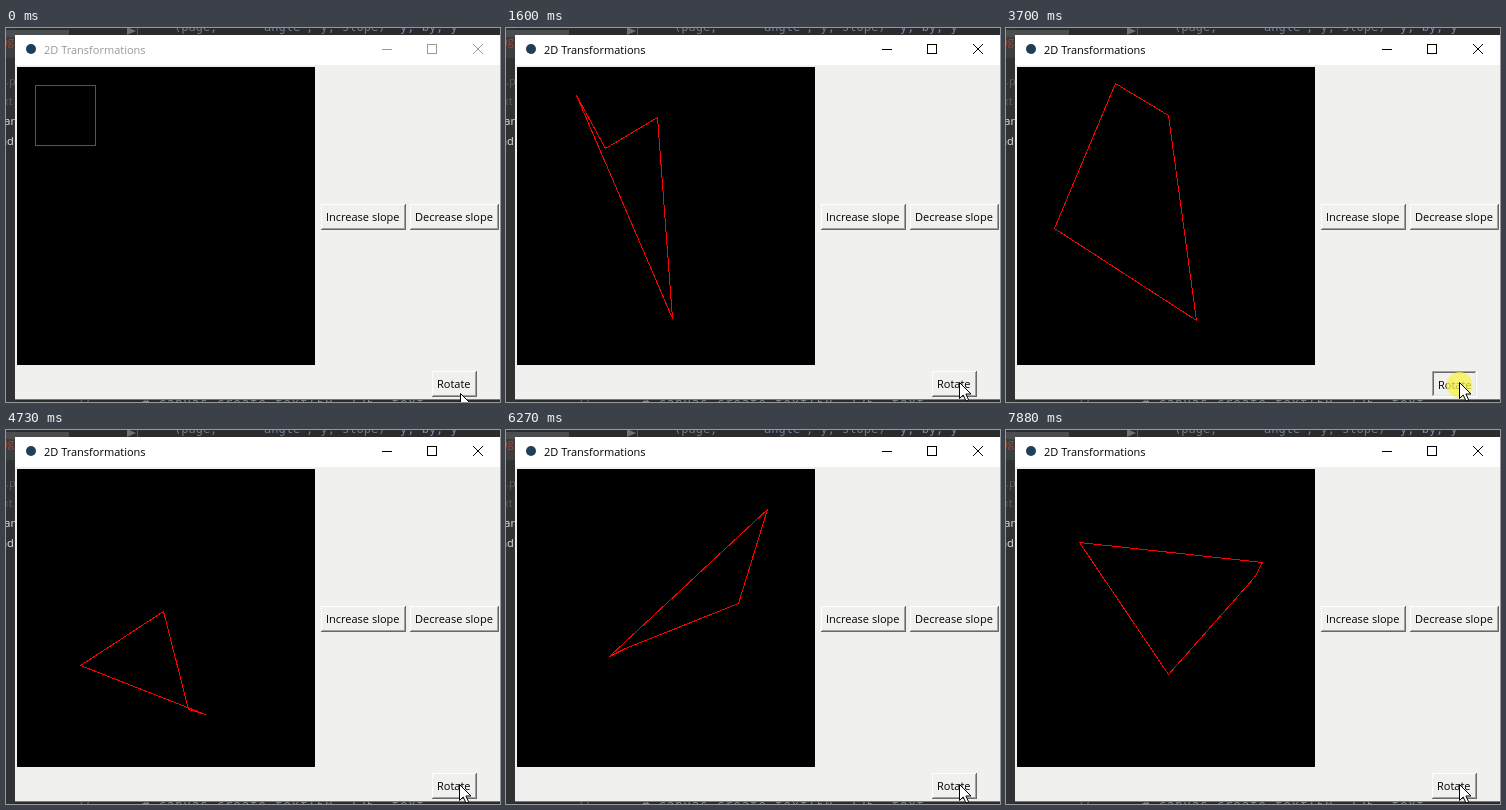
Animation of 494 by 374 pixels, one loop 8000 ms. Source, as an HTML page:

```html
<!DOCTYPE html>
<html lang="en">
<head>
<meta charset="utf-8">
<title>2D Transformations</title>
<style>
  html, body { margin: 0; width: 100%; height: 100%; overflow: hidden; background: #2b2b2d; }
  svg { display: block; width: 494px; height: 374px; }
  text { font: 11px "Open Sans", "Noto Sans", sans-serif; white-space: pre; }
  .code text { font: 12px "DejaVu Sans Mono", monospace; }
  .side text { font-size: 11px; }
  .crisp { shape-rendering: crispEdges; }
</style>
</head>
<body>
<svg viewBox="0 0 494 374">
  <rect width="494" height="374" fill="#2b2b2d"/>
  <g class="side">
    <rect width="9" height="374" fill="#303133"/>
    <rect width="63" height="7" y="2" fill="#4b4d4f"/>
    <rect width="9" height="21" y="9" fill="#3b3d3f"/>
    <text x="-5" y="17" fill="#9c4a3c">ng</text>
    <text x="0" y="57" fill="#5c5e60">.p</text>
    <text x="-7" y="77" fill="#5c5e60">txt</text>
    <text x="-6" y="97" fill="#e4e4e4">ran</text>
    <text x="-5" y="117" fill="#e4e4e4">ad</text>
  </g>
  <path class="crisp" d="M131.5 0V7" stroke="#55585a"/>
  <path d="M121 -1L130 3L121 7Z" fill="#6e7173"/>
  <g class="code">
    <text x="168" y="3" fill="#77797c">(page, </text>
    <text x="258" y="3" fill="#6f7f93">angle</text>
    <text x="300" y="3" fill="#77797c">, y, slope)</text>
    <text x="394" y="3" fill="#8a7fa8">y, by, y</text>
    <text x="70" y="379" fill="#686a6c">27</text>
    <text x="136" y="379" fill="#85878a" letter-spacing="1.1"># canvas.create_text(50, 125, text=</text>
  </g>

  <g class="crisp">
    <rect x="9" y="7" width="485" height="365" fill="#f0f0ee"/>
    <rect x="9" y="7" width="485" height="30" fill="#fff"/>
    <path d="M9 371.5H494" stroke="#77797a"/>
    <rect x="11" y="39" width="298" height="298" fill="#000"/>
  </g>
  <circle cx="25" cy="21" r="5" fill="#1f3e58"/>
  <text id="title" x="38" y="26">2D Transformations</text>
  <g id="chrome" fill="none">
    <path class="crisp" d="M376 21.5H386M421.5 16.5H430.5V25.5H421.5Z"/>
    <path d="M467 16L477 26M477 16L467 26"/>
  </g>

  <polygon id="shape" class="crisp" fill="none" stroke-width="1"/>
  <g id="buttons"></g>
  <circle id="glow" cx="453.5" cy="357" r="13" fill="#fbf34a" fill-opacity=".75"/>
  <path id="cursor" d="M.5 .5V16.5L4.2 13L7 19L9.6 17.8L6.9 12H12Z" fill="#fff" stroke="#000"/>
</svg>
<script>
const LOOP = 8000;
const ORIGIN = [9, 37];
const $ = id => document.getElementById(id);

// press and release time of every click
const clicks = [
  [250, 350], [910, 960], [1550, 1600], [2210, 2310], [2720, 2820], [3230, 3330],
  [3700, 3800], [4160, 4330], [4640, 4730], [5060, 5110], [5440, 5520], [5850, 5900],
  [6230, 6270], [6650, 6720], [7050, 7090], [7420, 7520], [7800, 7880]
];

// rotation by 10 degrees stored in unsigned bytes, then shifted by 10
const COS = Math.cos(Math.PI / 18), SIN = Math.sin(Math.PI / 18);
const byte = v => Math.trunc(v) & 255;
const rotate = ([x, y]) => [byte(x * COS + y * SIN) + 10, byte(y * COS - x * SIN) + 10];

const poses = [[[20, 20], [20, 80], [80, 80], [80, 20]]];
clicks.forEach((_, i) => poses.push(poses[i].map(rotate)));
const outlines = poses.map(pose =>
  pose.map(([x, y]) => `${x + ORIGIN[0] + .5},${y + ORIGIN[1] + .5}`).join(' '));

function button(label, x, y, w, h) {
  const g = document.createElementNS('http://www.w3.org/2000/svg', 'g');
  $('buttons').append(g);
  const edge = (inset, tl, br) => {
    const l = x + inset + .5, t = y + inset + .5;
    const r = x + w - inset - .5, b = y + h - inset - .5;
    return `<path d="M${l} ${b}V${t}H${r}" stroke="${tl}"/><path d="M${l - .5} ${b}H${r}V${t - .5}" stroke="${br}"/>`;
  };
  return down => {
    const edges = down
      ? edge(0, '#a0a0a0', '#fff') + edge(1, '#696969', '#e3e3e3')
      : edge(0, '#fff', '#696969') + edge(1, '#f0f0ee', '#a0a0a0');
    const shift = down ? 1 : 0;
    g.innerHTML = `<g class="crisp" fill="none">${edges}</g>` +
      `<text x="${x + 5 + shift}" y="${y + 17 + shift}">${label}</text>`;
  };
}

button('Increase slope', 315, 176, 85, 26)(false);
button('Decrease slope', 404, 176, 89, 26)(false);
const setRotate = button('Rotate', 426, 343, 45, 26);

let wasDown = null;

function draw(t) {
  const done = clicks.filter(c => t >= c[1]).length;
  const down = clicks.some(c => t >= c[0] && t < c[1]);
  const active = t >= clicks[0][0];

  $('shape').setAttribute('points', outlines[done]);
  $('shape').setAttribute('stroke', done ? '#f00' : '#555');
  $('title').setAttribute('fill', active ? '#000' : '#999');
  $('chrome').setAttribute('stroke', active ? '#000' : '#999');
  $('glow').setAttribute('visibility', down ? 'visible' : 'hidden');
  if (down !== wasDown) setRotate(wasDown = down);

  // pointer arrives in a few discrete moves
  const step = t < 30 ? 0 : Math.min(3, 1 + Math.floor((t - 30) / 64));
  const x = Math.round(455 - step / 3);
  const y = Math.round(366 - 11 * step / 3);
  $('cursor').setAttribute('transform', `translate(${x - 1} ${y - 1})`);
}

const start = performance.now();
function tick() {
  draw((performance.now() - start) % LOOP);
  requestAnimationFrame(tick);
}
tick();
</script>
</body>
</html>
```
